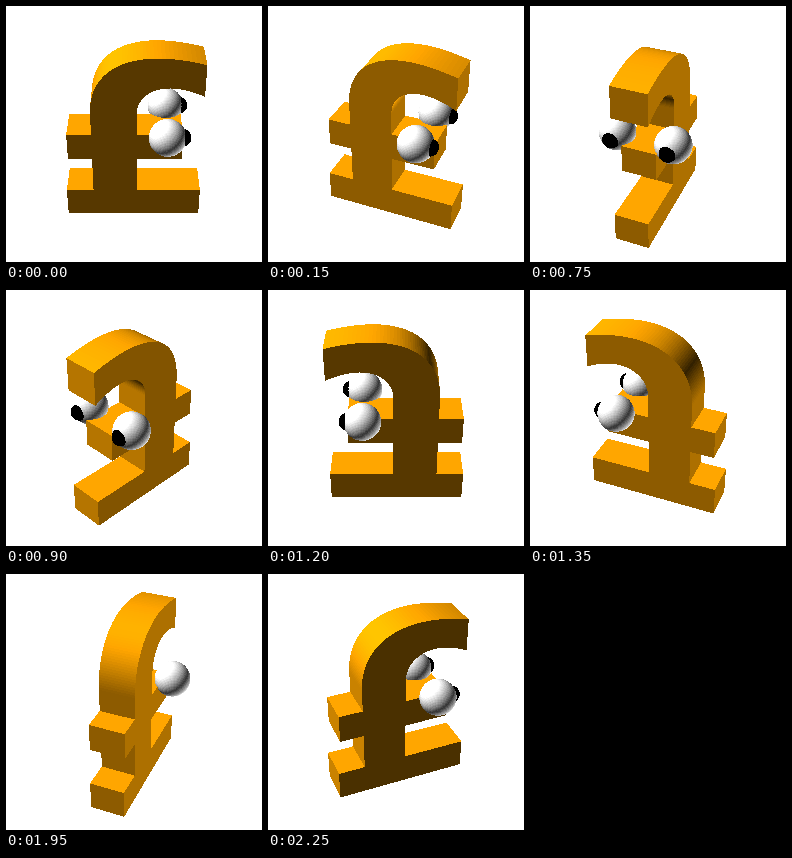
Recreate the animation shown at these times as an HTML page with a canvas. Size 256x256 px, loop 2400 ms.

```html
<!DOCTYPE html>
<html lang="en">
<head>
<meta charset="utf-8">
<title>Rotating pound</title>
<style>
  html, body { margin: 0; width: 100%; height: 100%; overflow: hidden; background: #fff; }
  canvas { display: block; width: 256px; height: 256px; }
</style>
</head>
<body>
<canvas width="256" height="256"></canvas>
<script>
const SIZE = 256, STEPS = 16, STEP_MS = 150;
const DIST = 643, TILT = 35 * Math.PI / 180;
const ORANGE = [255, 165, 0], WHITE = [255, 255, 255], BLACK = [0, 0, 0];
const DEPTH = 18;
const ctx = document.querySelector('canvas').getContext('2d');
const quads = [];

// Model axes: x right, y towards the viewer, z up.
const quad = (color, ...points) => quads.push({ color, points });

// Extrudes a four-cornered outline of the x/z plane.
function prism(color, outline) {
  const front = outline.map(([x, z]) => [x, DEPTH, z]);
  const back = outline.map(([x, z]) => [x, -DEPTH, z]);
  quad(color, ...front);
  quad(color, ...back);
  front.forEach((p, i) => {
    const j = (i + 1) % 4;
    quad(color, p, front[j], back[j], back[i]);
  });
}

const bar = (x0, x1, z0, z1) => prism(ORANGE, [[x0, z0], [x1, z0], [x1, z1], [x0, z1]]);

function sphere(color, cx, cy, cz, r, rings = 36) {
  const at = (i, j) => {
    const lat = Math.PI * i / rings, lon = Math.PI * j / rings;
    return [cx + r * Math.sin(lat) * Math.cos(lon), cy + r * Math.sin(lat) * Math.sin(lon), cz + r * Math.cos(lat)];
  };
  for (let i = 0; i < rings; i++)
    for (let j = 0; j < rings * 2; j++)
      quad(color, at(i, j), at(i, j + 1), at(i + 1, j + 1), at(i + 1, j));
}

const bezier = (a, b, c, d) => t => a.map((v, k) =>
  v * (1 - t) ** 3 + 3 * b[k] * t * (1 - t) ** 2 + 3 * c[k] * t * t * (1 - t) + d[k] * t ** 3);

function hook(outer, inner, segments) {
  for (let i = 0; i < segments; i++) {
    const t = i / segments, next = (i + 1) / segments;
    prism(ORANGE, [outer(t), outer(next), inner(next), inner(t)]);
  }
}

const LEFT = -41.6, RIGHT = 2.7, TIP = 66, BEND = 36;
bar(-69, 67.8, -89.3, -57.5);
bar(-65.6, 47.2, -17.7, 11.8);
bar(LEFT, RIGHT, -89, BEND);
hook(
  bezier([LEFT, BEND], [LEFT, 80], [-8, 108.5], [TIP, 88]),
  bezier([RIGHT, BEND], [RIGHT, 58], [26, 75], [TIP, 54.5]),
  48
);
for (const y of [-28.8, 28.8]) {
  sphere(WHITE, 32, y, 15.7, 18);
  sphere(BLACK, 46, y, 15.7, 8.5);
}

const sub = (a, b) => a.map((v, i) => v - b[i]);
const dot = (a, b) => a[0] * b[0] + a[1] * b[1] + a[2] * b[2];
const cross = (a, b) => [a[1] * b[2] - a[2] * b[1], a[2] * b[0] - a[0] * b[2], a[0] * b[1] - a[1] * b[0]];

// Two opposite lights plus a little ambient light.
function shade(p) {
  const n = cross(sub(p[2], p[0]), sub(p[3], p[1]));
  const len = Math.hypot(...n) || 1;
  return 0.2 + Math.abs(dot(n, [-1, 1, 1])) / len / Math.sqrt(3);
}

function fillTriangle(a, b, c, rgb, pixels, depth) {
  const area = (b[0] - a[0]) * (c[1] - a[1]) - (b[1] - a[1]) * (c[0] - a[0]);
  if (!area) return;
  const range = k => [Math.ceil(Math.min(a[k], b[k], c[k]) - 0.5), Math.floor(Math.max(a[k], b[k], c[k]) - 0.5)];
  const [x0, x1] = range(0), [y0, y1] = range(1);
  for (let y = y0; y <= y1; y++)
    for (let x = x0; x <= x1; x++) {
      const px = x + 0.5 - a[0], py = y + 0.5 - a[1];
      const u = (px * (c[1] - a[1]) - py * (c[0] - a[0])) / area;
      const v = (py * (b[0] - a[0]) - px * (b[1] - a[1])) / area;
      if (u < 0 || v < 0 || u + v > 1) continue;
      const near = a[2] + u * (b[2] - a[2]) + v * (c[2] - a[2]);
      const i = y * SIZE + x;
      if (near <= depth[i]) continue;
      depth[i] = near;
      pixels.set(rgb, i * 4);
    }
}

function render(angle) {
  const image = ctx.createImageData(SIZE, SIZE);
  image.data.fill(255);
  const depth = new Float64Array(SIZE * SIZE);
  const ca = Math.cos(angle), sa = Math.sin(angle), ct = Math.cos(TILT), st = Math.sin(TILT);
  const toEye = ([x, y, z]) => {
    const side = x * ca - y * sa, near = x * sa + y * ca;
    return [side, z * ct - near * st, near * ct + z * st];
  };
  const toScreen = ([x, y, z]) => {
    const k = DIST / (DIST - z);
    return [SIZE / 2 + x * k, SIZE / 2 - y * k, k];
  };
  for (const { color, points } of quads) {
    const eye = points.map(toEye), light = shade(eye);
    const rgb = color.map(v => Math.min(255, v * light));
    const [a, b, c, d] = eye.map(toScreen);
    fillTriangle(a, b, c, rgb, image.data, depth);
    fillTriangle(a, c, d, rgb, image.data, depth);
  }
  return image;
}

const views = [];
let shown = -1;
function draw(now) {
  const step = Math.floor(now / STEP_MS) % STEPS;
  if (step !== shown) {
    views[step] ??= render(step / STEPS * 2 * Math.PI);
    ctx.putImageData(views[step], 0, 0);
    shown = step;
  }
  requestAnimationFrame(draw);
}
draw(0);
</script>
</body>
</html>
```
